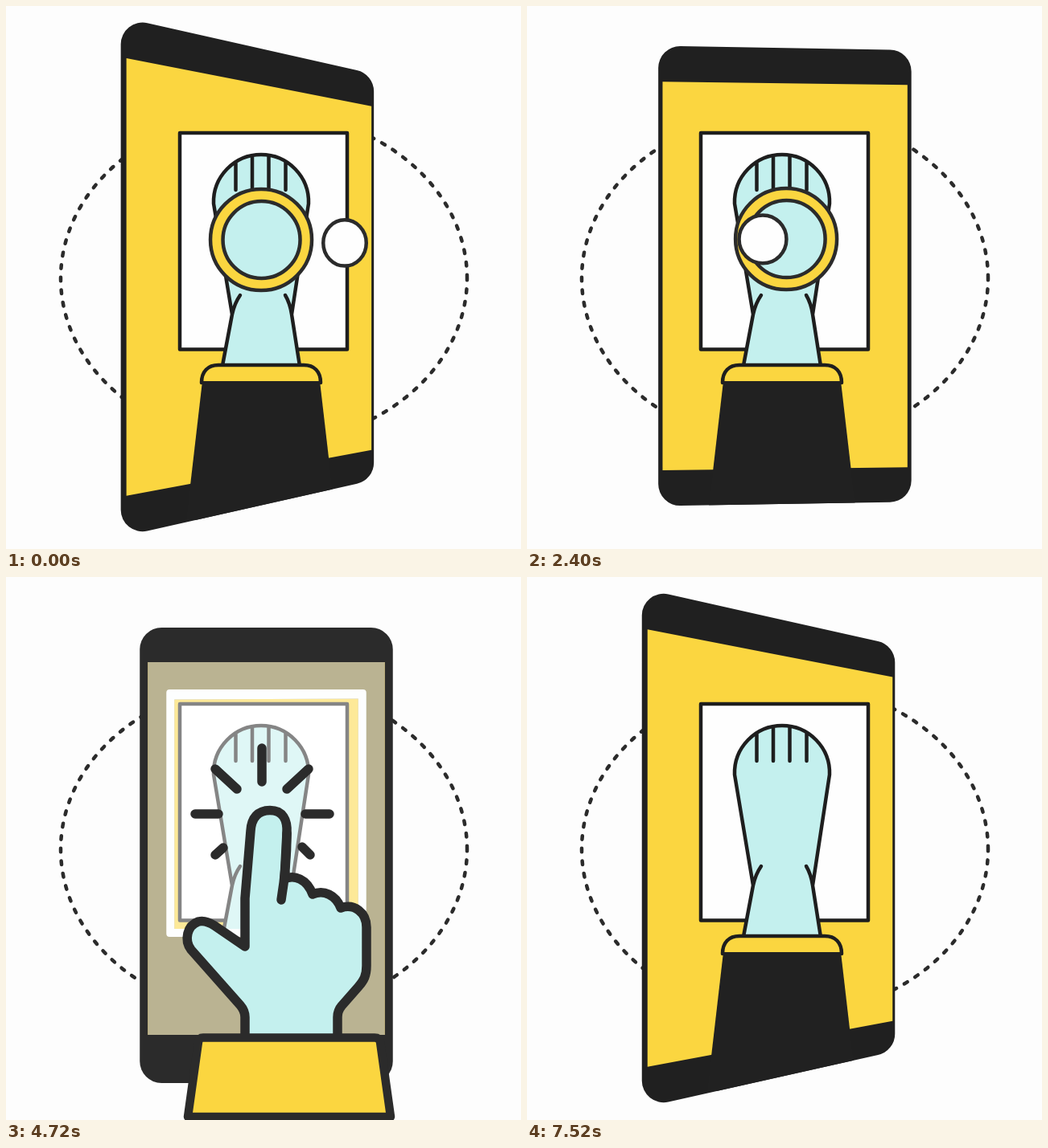
Animation, 640 px wide and 676 px high, one loop 7.6 s. Source, as an HTML page with a canvas:

```html
<!DOCTYPE html>
<html lang="en">
<head>
<meta charset="utf-8">
<title>Scan and tap</title>
<style>
html, body { margin: 0; width: 100%; height: 100%; overflow: hidden; background: #fdfdfd; }
canvas { display: block; width: 640px; height: 676px; }
</style>
</head>
<body>
<canvas id="stage" width="640" height="676"></canvas>
<script>
const ctx = document.getElementById('stage').getContext('2d');
const LOOP = 7600, STEP = 80;
const INK = '#1e1e1e', SOFT_INK = '#2b2b2b', YELLOW = '#fbd640', AQUA = '#c4f0ee', DIM = '#7f7236';

const clamp = v => Math.max(0, Math.min(1, v));
const lerp = (a, b, k) => a + (b - a) * k;
const span = (t, a, b) => clamp((t - a) / (b - a));
const ease = k => (1 - Math.cos(Math.PI * k)) / 2;
const swing = (t, a, b) => ease(span(t, a, b));

const footSide = 'M269.5 445 L281 384 L258 246 A59.03 59.03 0 1 1 376 246 L355 384 L364.500 445';
const foot = new Path2D(footSide);
const footLines = new Path2D(footSide + 'M281 384 Q284 370 291 360 M355 384 Q353 370 347 360' +
  'M285.500 194 V229 M306 187 V229 M326.500 187 V229 M347.500 194 V229');
const cuff = new Path2D('M243 469 C243 455 251 447 264 447 H370 C383 447 391 455 391 469');
const leg = new Path2D('M244 467 H390 L410 640 H224 Z');
const hand = new Path2D('M297 576 V548 Q297 540 291 533 L230 464 C221 452 225 434 239 429 C247 427 253 430 259 434 L297 460 V400 ' +
  'L304 316 C305 300 313 290.500 328 290.500 C344 290.500 350 302 349 319 L346 376 C358 370 374 376 381 395 ' +
  'C395 389 410 396 416 412 C433 406 448 418 448 436 V484 C448 496 445 502 438 510 L417 534 Q412 540 412 548 V576');
const finger = new Path2D('M349 319 Q349 360 342 402');
const sleeve = new Path2D('M245 573.500 H458 Q464 573.500 465 579 L478 672 H226 L239 579 Q240 573.500 245 573.500 Z');
const rays = [[318, 255, 318, 213], [287, 264, 260, 239], [349, 264, 376, 239],
  [264, 295, 235, 295], [372, 295, 402, 295], [270, 337, 260, 346], [368, 336, 378, 346]];

function paint(path, fill, stroke, width) {
  if (fill) { ctx.fillStyle = fill; ctx.fill(path); }
  if (stroke) { ctx.strokeStyle = stroke; ctx.lineWidth = width; ctx.stroke(path); }
}

function oval(x, y, rx, ry, fill) {
  const p = new Path2D();
  p.ellipse(x, y, rx, ry, 0, 0, 2 * Math.PI);
  paint(p, fill, SOFT_INK, 4.5);
}

// Corners run clockwise from the top left.
function quad(pts, r = 0, path = new Path2D()) {
  const [a, b] = pts;
  path.moveTo((a[0] + b[0]) / 2, (a[1] + b[1]) / 2);
  for (let i = 1; i <= 4; i++) {
    const c = pts[i % 4], n = pts[(i + 1) % 4];
    path.arcTo(c[0], c[1], n[0], n[1], r);
  }
  path.closePath();
  return path;
}

const turned = s => ({
  x: 321.6 - 0.23 * s - 1.5e-5 * s ** 3,
  y: 336 + 0.02 * Math.abs(s),
  h: 567 + 0.13 * Math.abs(s),
  s
});
const FLAT = { x: 323.5, y: 346.5, h: 567, s: 0 };
const mix = (a, b, k) => ({ x: lerp(a.x, b.x, k), y: lerp(a.y, b.y, k), h: lerp(a.h, b.h, k), s: lerp(a.s, b.s, k) });

function stateAt(t) {
  if (t >= 5850) {
    const p = swing(t, 5850, 7600), flat = clamp(1 - 4 * p);
    return { pose: mix(FLAT, turned(71), p), flat, dim: clamp(1 - 1.4 * p), crop: flat };
  }
  const s = t < 1287 ? lerp(71, -66, swing(t, 0, 1287)) : lerp(-66, 8.5, swing(t, 1287, 2574));
  const flat = swing(t, 2650, 3160);
  return { pose: mix(turned(s), FLAT, flat), flat, dim: flat, crop: 1 };
}

function geometry({ pose, flat, crop }) {
  const { x, y, h, s } = pose, w = 314.5, x0 = x - w / 2;
  const top = px => y - (h + s - 2 * s * (px - x0) / w) / 2;
  const bottom = px => y + (h + s - 2 * s * (px - x0) / w) / 2;
  const at = (u, v) => { const px = x0 + u * w; return [px, lerp(top(px), bottom(px), v)]; };
  const fix = (a, b) => lerp(a, b, flat);
  const l = x0 + fix(5.2 + 0.025 * s, 10), r = x0 + w - fix(5 - 0.028 * s, 10);
  const u0 = lerp(0.099, 0.105, crop), u1 = lerp(0.914, 0.895, crop);
  const v0 = lerp(0.14, 0.136, crop), v1 = lerp(0.7, 0.679, crop);
  const frame = [at(u0, v0), at(u1, v0), at(u1, v1), at(u0, v1)];
  const [a, b, c, d] = frame;
  return {
    body: quad([at(0, 0), at(1, 0), at(1, 1), at(0, 1)], 27),
    screen: [
      [l, top(l) + fix(44 + 0.08 * s, 43)], [r, top(r) + fix(43.7 - 0.045 * s, 43)],
      [r, bottom(r) - fix(43.7 - 0.08 * s, 60)], [l, bottom(l) - fix(44 + 0.08 * s, 60)]
    ],
    frame,
    inner: [[a[0] + 10, a[1] + 12.5], [b[0] - 10, b[1] + 11.5], [c[0] - 10, c[1] - 9.5], [d[0] + 10, d[1] - 10]]
  };
}

function drawOrbit() {
  const p = new Path2D();
  p.ellipse(320.5, 339, 252.5, 207, 0, 0, 2 * Math.PI);
  ctx.setLineDash([4.5, 11.2]);
  ctx.lineDashOffset = 2.25;
  paint(p, null, SOFT_INK, 4.5);
  ctx.setLineDash([]);
}

function drawLevel(t, s) {
  const lean = Math.max(0, s);
  const rx = 322.5 - 0.077 * lean, ry = 290 + 0.014 * lean;
  const bx = t < 1400 ? lerp(421, 217, swing(t, 0, 1287)) : lerp(217, 322.5, swing(t, 1400, 2950));
  const far = Math.abs(bx - rx);
  oval(rx, ry, 63, 63, YELLOW);
  oval(rx + 0.5, ry, 48, 48, AQUA);
  oval(bx, 290 + 0.07 * lean, 30.5 - 0.036 * far, 30.5 - 0.018 * far, '#fefefe');
}

function drawPhone(t) {
  const state = stateAt(t), { flat, dim, pose } = state, g = geometry(state);
  const shade = lerp(0x20, 0x2b, flat), ink = `rgb(${shade},${shade},${shade})`;
  paint(g.body, ink);
  paint(quad(g.screen), YELLOW);

  ctx.globalAlpha = dim;
  ctx.fillStyle = DIM;
  ctx.fill(quad(g.inner, 0, quad(g.screen)), 'evenodd');
  ctx.globalAlpha = 1;

  const box = new Path2D();
  box.rect(216, 158, 208, 269.5);
  paint(box, '#fefefe', INK, 4.5);
  paint(foot, AQUA);
  paint(footLines, null, INK, 4.5);

  ctx.globalAlpha = dim;
  ctx.fillStyle = '#fafdfd';
  ctx.fill(quad(g.inner, 0, quad(g.frame, 4)), 'evenodd');

  ctx.globalAlpha = 1 - flat;
  paint(cuff, YELLOW, INK, 4.5);
  ctx.save();
  ctx.clip(g.body);
  paint(leg, '#212121');
  ctx.restore();
  if (t < 3160) drawLevel(t, pose.s);

  ctx.globalAlpha = t < 4960 ? 0.92 * span(t, 4480, 4960) : 0.92 * (1 - span(t, 4960, 5360));
  paint(quad(g.screen), '#fff');
  ctx.globalAlpha = 1;
}

function drawRays(t) {
  const grow = span(t, 3840, 4000);
  if (!grow || t >= 5400) return;
  ctx.globalAlpha = 1 - span(t, 5240, 5400);
  for (const [x0, y0, x1, y1] of rays) {
    const p = new Path2D();
    p.moveTo(x0, y0);
    p.lineTo(lerp(x0, x1, grow), lerp(y0, y1, grow));
    paint(p, null, SOFT_INK, 11.5);
  }
  ctx.globalAlpha = 1;
}

function drawHand(t) {
  if (t < 3240 || t > 6120) return;
  const rise = (1 - span(t, 3240, 3840)) ** 3 * 400;
  const leave = span(t, 5560, 6100) ** 1.5 * 410;
  ctx.save();
  ctx.translate(leave * 0.54, rise + leave);
  paint(hand, AQUA, SOFT_INK, 11.5);
  paint(finger, null, SOFT_INK, 11.5);
  paint(sleeve, YELLOW, SOFT_INK, 10.5);
  ctx.restore();
}

function draw(t) {
  ctx.globalAlpha = 1;
  ctx.fillStyle = '#fdfdfd';
  ctx.fillRect(0, 0, 640, 676);
  drawOrbit();
  drawPhone(t);
  drawRays(t);
  drawHand(t);
}

ctx.lineCap = ctx.lineJoin = 'round';
const start = performance.now();
function tick() {
  const t = (performance.now() - start) % LOOP;
  draw(Math.floor(t / STEP) * STEP);
  requestAnimationFrame(tick);
}
tick();
</script>
</body>
</html>
```
